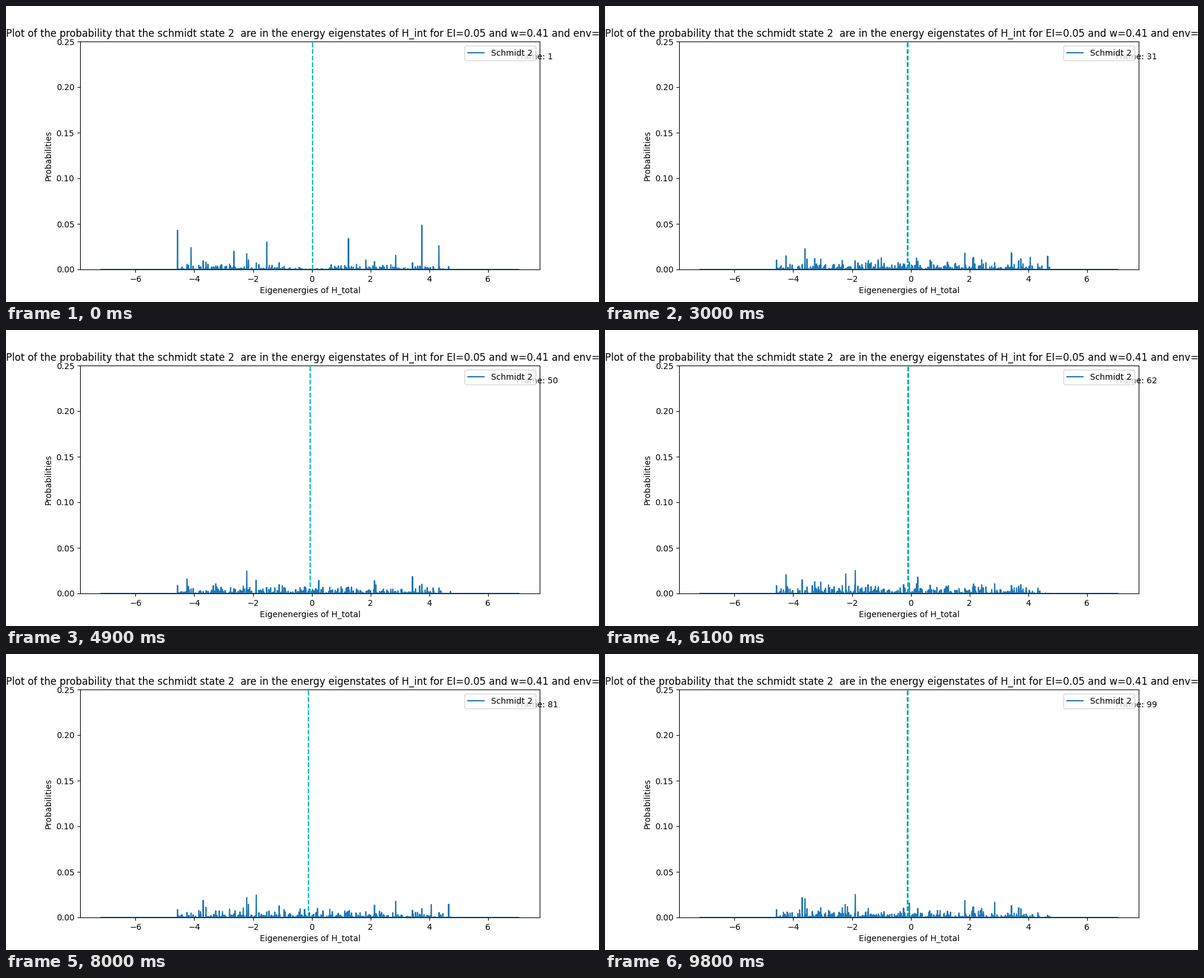
Recreate the animation shown at these times as a matplotlib script. Size 1000 px wide and 500 px high, loop 9.9 s.

```python
import numpy as np
import matplotlib.pyplot as plt
from matplotlib.animation import FuncAnimation

FRAMES, INTERVAL = 99, 100
E_MIN, E_MAX = -7.176, 7.052
LEVELS = 480

# Energies and probabilities of the levels that dominate at the start
STRONG_E = np.array([-4.57, -4.11, -2.65, -1.53, 1.25, 3.75, 4.33])
STRONG_P = np.array([0.043, 0.024, 0.020, 0.030, 0.034, 0.0485, 0.026])

# Turning points of the mean energy
MEAN_STEPS = [0, 15, 30, 49, 72, 88, 98]
MEAN_ENERGY = [0.03, -0.15, -0.105, -0.05, -0.105, -0.125, -0.105]

rng = np.random.default_rng(7)
weak_e = 9.4 * rng.beta(1.4, 1.4, LEVELS) - 4.65
cos_part, sin_part = rng.normal(0, 1, (2, LEVELS))
frequency = rng.uniform(0.03, 0.35, LEVELS)

energies = np.concatenate([STRONG_E, weak_e])
order = np.argsort(energies)
spike_x = (energies[order][:, None] + [-0.008, 0, 0.008]).ravel()
curve_x = np.concatenate([[E_MIN], spike_x, [E_MAX]])


def probabilities(step):
    """Random amplitudes of total weight near one, spreading from the start."""
    strong = STRONG_P * (0.2 + 0.8 * np.exp(-step / 10))
    angle = frequency * step
    amplitude = cos_part * np.cos(angle) + sin_part * np.sin(angle)
    early = np.exp(-step / 6)
    centre_gap = 1 - 0.95 * early * np.exp(-(weak_e / 0.7) ** 2)
    weak = 0.002 * (1 - 0.35 * early) * centre_gap * amplitude ** 2
    heights = np.concatenate([strong, weak])[order]
    spikes = (heights[:, None] * [0, 1, 0]).ravel()
    return np.concatenate([[0], spikes, [0]])


def mean_energies(step):
    mean = np.interp(step, MEAN_STEPS, MEAN_ENERGY)
    gap = 0.012 + 0.045 * np.exp(-((step - 15) / 8) ** 2)
    return mean - gap / 2, mean + gap / 2


fig, ax = plt.subplots(figsize=(10, 5), dpi=100)
curve, = ax.plot(curve_x, probabilities(0), label="Schmidt 2")
mean_lines = [ax.axvline(0, color=color, linestyle="--")
              for color in ("teal", "c")]
counter = ax.text(0.95, 0.95, "", transform=ax.transAxes, va="top")
ax.set(xlim=(-7.887, 7.763), ylim=(0, 0.25),
       xlabel="Eigenenergies of H_total", ylabel="Probabilities")
ax.set_title("Plot of the probability that the schmidt state 2  are in the "
             "energy eigenstates of H_int for EI=0.05 and w=0.41 and env=0.1",
             x=-125 / 775, ha="left")
ax.legend(loc="upper right")


def update(step):
    curve.set_ydata(probabilities(step))
    for line, energy in zip(mean_lines, mean_energies(step)):
        line.set_xdata([energy, energy])
    counter.set_text(f"Frame: {step + 1}")
    return [curve, *mean_lines, counter]


anim = FuncAnimation(fig, update, frames=FRAMES, interval=INTERVAL,
                     repeat=True, repeat_delay=0)
plt.show()
```
